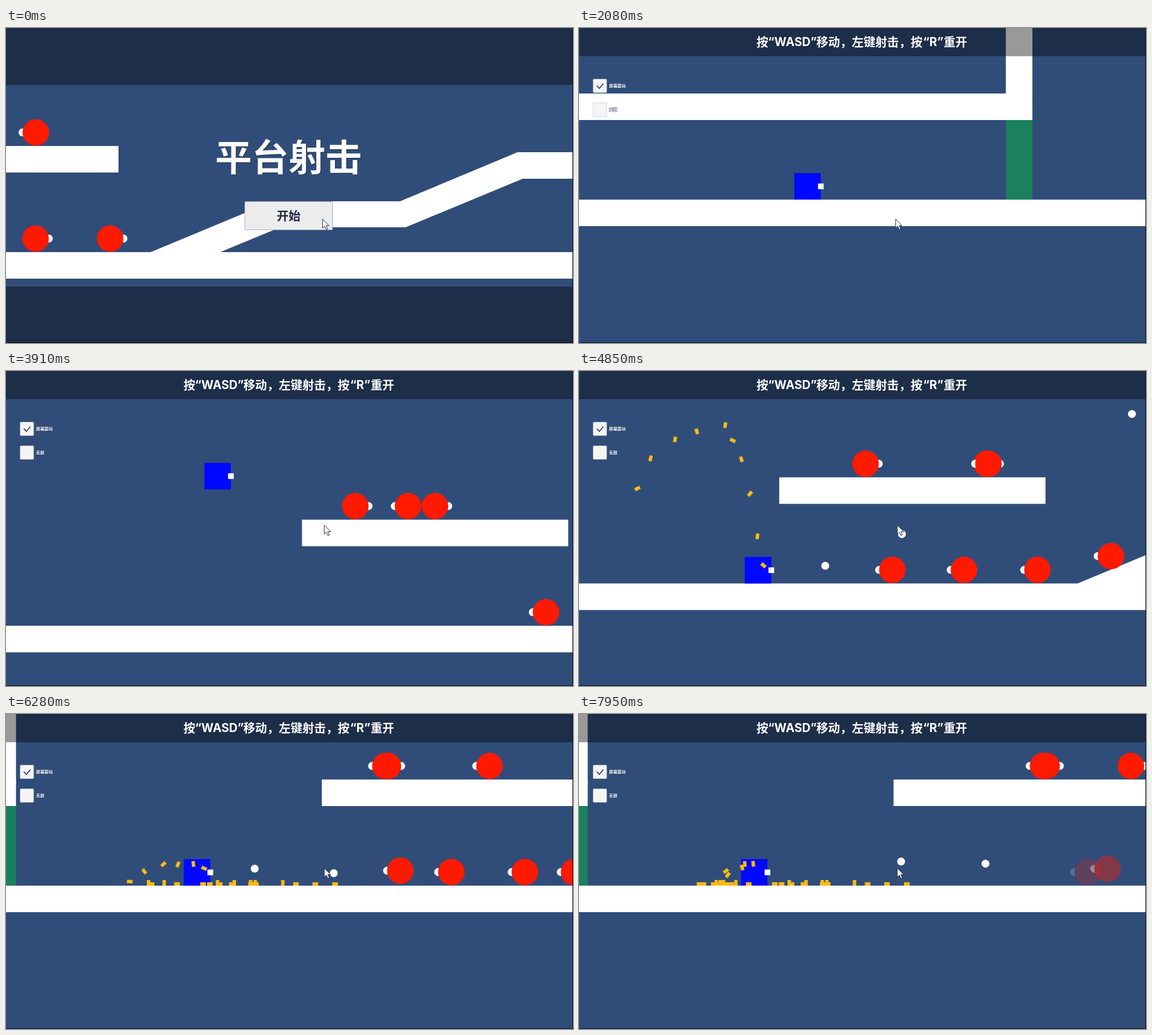
Recreate the animation shown at these times as an HTML page. Size 1003 by 558 pixels, loop 8000 ms.

```html
<!DOCTYPE html>
<html lang="zh-CN">
<head>
<meta charset="utf-8">
<title>平台射击</title>
<style>
  html, body { margin: 0; width: 100%; height: 100%; overflow: hidden; background: #304d79; }
  svg { display: block; width: 100vw; height: 100vh; }
  text { font-family: "Noto Sans CJK SC", "Noto Sans CJK", sans-serif; font-weight: 700; fill: #fff; }
  .latin { font-family: Inter, "Open Sans", sans-serif; text-anchor: middle; }
  .hint { font-size: 20.85px; }
  .small { font-size: 7.4px; paint-order: stroke; stroke: #27406a; stroke-width: .8px; }
  .mid { text-anchor: middle; }
  .box { fill: #f5f5f5; stroke: #b9bfcb; stroke-width: .6px; }
</style>
</head>
<body>
<svg viewBox="0 0 1003 558" preserveAspectRatio="none">
  <rect width="1003" height="558" fill="#304d79"/>
  <g id="world">
    <g fill="#fff">
      <rect x="-3000" y="0" width="6000" height="47"/>
      <rect x="-3000" y="-188" width="3047" height="47"/>
      <rect x="0" y="-1200" width="47" height="1020"/>
      <rect x="588" y="-188" width="471" height="47"/>
      <path d="M1116 1V0L1332-90H1557L1765-177H1950V-130H1774L1567-44H1345L1239 0V1Z"/>
    </g>
    <rect x="0" y="-141" width="47" height="141" fill="#1a805e"/>
    <g id="actors"></g>
  </g>
  <g id="menu">
    <path d="M0 0H1003V101H0ZM0 458H1003V558H0Z" opacity=".4"/>
    <text class="mid" x="501" y="254" font-size="65" style="fill:#1c2c4a">平台射击</text>
    <text class="mid" x="500" y="253" font-size="65">平台射击</text>
    <rect id="button" x="422.500" y="307.500" width="155" height="50" rx="1.500" stroke="#a9adb8"/>
    <text class="mid" x="500" y="340" font-size="21" style="fill:#1e2742">开始</text>
  </g>
  <g id="hud">
    <rect width="1003" height="50" opacity=".4"/>
    <g class="hint">
      <text x="314" y="32">按</text>
      <text class="latin" x="377.500" y="32">“WASD”</text>
      <text x="420" y="32">移动，左键射击，按</text>
      <text class="latin" x="626.500" y="32">“R”</text>
      <text x="645" y="32">重开</text>
    </g>
    <rect class="box" x="25" y="90.500" width="24" height="24" rx="1.500"/>
    <path d="M31.500 102L36 107L43 98.500" fill="none" stroke="#26324f" stroke-width="1.600"/>
    <text class="small" x="53" y="105">屏幕震动</text>
    <rect class="box" x="25" y="132.500" width="24" height="24" rx="1.500"/>
    <text class="small" x="53" y="147">无敌</text>
  </g>
  <path id="cursor" d="M0 0V16L3.700 12.600L6.500 18.500L9 17.400L6.300 11.600H11.400Z" fill="#fff" stroke="#1b2338"/>
  <path d="M0 557.500H1002.500V0" fill="none" stroke="#0a0f1a"/>
</svg>
<script>
const LOOP = 8000, PLAY = 450, STEP = 5;
const FOLLOW = 5, LOOK = 188;             // camera rate per second, look-ahead in px
const JUMP = 3530, AIR = 1210, PEAK = 280;
const BULLET = 1.42;                      // px per ms
const LEDGE = 612, BEAT = 423;            // guards' left turn and width of their walk

const $ = id => document.getElementById(id);
const rnd = n => { const v = Math.sin(n * 127.1) * 43758.5; return v - Math.floor(v); };
const clamp = (v, a, b) => Math.min(b, Math.max(a, v));
const repeat = (n, make) => Array.from({ length: n }, (_, i) => make(i));

// Straight moves through [time, value] points
function track(pts, t) {
  let i = 1;
  while (i < pts.length - 1 && t > pts[i][0]) i++;
  const [a, x] = pts[i - 1], [b, y] = pts[i];
  return x + (y - x) * (t - a) / (b - a);
}

// World: x from the left side of the door, heights from the floor
const walk = [[0, -798], [1150, -798], [3760, 390], [3910, 415], [4300, 527],
  [4945, 527], [5490, 320], [5640, 285], [6200, 345], [7950, 318]];
const playerX = t => track(walk, t);
const facing = t => t > 4945 && t < 5640 ? -1 : 1;
function jump(t) {
  const s = clamp((t - JUMP) / AIR, 0, 1);
  return 4 * PEAK * s * (1 - s);
}

// Camera eases after the player
const camera = [];
{
  const aim = t => 477.5 - LOOK * facing(t) - playerX(t);
  const ease = 1 - Math.exp(-FOLLOW * STEP / 1000);
  let x = aim(0), y = 0;
  for (let t = 0; t <= LOOP + STEP; t += STEP) {
    camera.push([x, y]);
    x += (aim(t) - x) * ease;
    y += (jump(t) - y) * ease;
  }
}
function view(t) {
  const i = Math.floor(t / STEP), f = t / STEP - i, a = camera[i], b = camera[i + 1];
  return [a[0] + (b[0] - a[0]) * f, 304 + a[1] + (b[1] - a[1]) * f];
}

const rise = x => clamp((x - 1116) * 0.4167, 0, 90);

// Guards pace to and fro on the platform
const guard = (phase, speed) => t => {
  const lap = 2 * BEAT, u = ((phase + speed * (t - 3910) / 1000) % lap + lap) % lap;
  return { x: LEDGE + BEAT - Math.abs(u - BEAT), h: 212, dir: u < BEAT ? 1 : -1, alpha: 1, alive: true };
};

// Chasers walk left, are pushed back under fire, then hop and fade
const chaser = (x0, die, held) => t => {
  const stop = die - held;
  const x = x0 - 0.25 * (Math.min(t, stop) - 4850) + 0.06 * Math.max(0, t - stop);
  const s = clamp((t - die) / 200, 0, 1);
  return {
    x, h: rise(x) + 24 + 68 * s * (1 - s), dir: -1,
    alpha: clamp(1 - (t - die) / 300, 0, 1), alive: t < die
  };
};

const foes = [
  guard(70, 290), guard(211, 307), guard(682, 311),
  chaser(785, 4960, 120),
  ...repeat(4, i => chaser(915 + 130 * i, 5985 + 288 * i, 120)),
  ...repeat(2, i => chaser(1392 + 52 * i, 7716 + 54 * i, 780))
];

function bulletAt(s, t) {
  const d = (t - s.t) * BULLET;
  return { x: s.x + s.dir * d, h: s.h - d * s.slope };
}
function blocked(b, t) {
  if (b.x > 588 && b.x < 1059 && b.h > 141 && b.h < 188) return true;
  if (b.x > 1116 && b.h < rise(b.x)) return true;
  return foes.some(foe => {
    const e = foe(t);
    return e.alpha > 0 && Math.abs(b.h - e.h) < 27 && b.x > e.x + (e.alive ? -26 : 2) && b.x < e.x + 32;
  });
}

// Each shot has a bullet and a falling shell; aim drifts up and now and then dips
const burst = (start, count, gap) => repeat(count, i => start + gap * i);
const shots = [...burst(3925, 11, 95.5), ...burst(4967, 7, 97), ...burst(5707, 21, 104)].map((t, i) => {
  const dir = facing(t), dip = (1 + Math.cos(1.7 * (i - 14))) / 2;
  const s = {
    t, dir, x: playerX(t) + 24 + dir * 24, h: jump(t) + 24,
    slope: -0.08 + 0.205 * dip ** 3,
    vx: 125 + 40 * rnd(i + 1), vy: 118 + 24 * rnd(i + 51),
    spin: 300 + 500 * rnd(i + 101), upright: rnd(i + 151) < 0.2
  };
  s.fall = (s.vy + Math.sqrt(s.vy ** 2 + 1040 * (s.h - 3))) / 520;
  for (s.end = t; s.end < t + 900; s.end += 4) {
    const b = bulletAt(s, s.end);
    if (b.h < 1) s.splash = b.x;
    if (b.h < 1 || blocked(b, s.end)) break;
  }
  return s;
});

const dot = (x, y, r, fill, more = '') => `<circle cx="${x}" cy="${y}" r="${r}" fill="${fill}" ${more}/>`;
const rect = (x, y, w, h, fill, more = '') =>
  `<rect x="${x}" y="${y}" width="${w}" height="${h}" fill="${fill}" ${more}/>`;

const drawFoe = ({ x, h, dir, alpha = 1 }) => alpha <= 0 ? '' :
  `<g opacity="${alpha}">${dot(x + dir * 23.5, -h, 7, '#fff')}${dot(x, -h, 23.5, '#ff1a00')}</g>`;

function drawShell(s, t) {
  const age = (t - s.t) / 1000, u = Math.min(age, s.fall), down = age >= s.fall;
  const x = s.x - s.dir * (4 + s.vx * u);
  const y = -(s.h + s.vy * u - 260 * u * u) - (down && s.upright ? 2 : 0);
  const turn = down ? (s.upright ? 90 : 0) : s.spin * u;
  return rect(-5, -3, 10, 6, '#fdb913', `transform="translate(${x} ${y}) rotate(${turn})"`);
}

function drawSplash(s, t) {
  const age = t - s.end;
  if (s.splash === undefined || age < 0 || age > 180) return '';
  return repeat(6, i => {
    const a = i * Math.PI / 3 + 0.45, r = 4 + age * 0.07;
    return dot(s.splash + r * Math.cos(a), -3 + r * Math.sin(a), 3.2, '#ffd21f', 'stroke="#c99508" stroke-width=".8"');
  }).join('');
}

function drawGame(t) {
  const x = playerX(t), y = -jump(t), fired = shots.filter(s => s.t <= t);
  let out = foes.map(foe => drawFoe(foe(t))).join('');
  out += rect(x, y - 47, 47, 47, '#0008ff');
  out += rect(x + 18.5 + facing(t) * 23.5, y - 28.5, 10, 10, '#fff');
  for (const s of fired) out += drawShell(s, t) + drawSplash(s, t);
  for (const s of fired) {
    if (t >= s.end) continue;
    const b = bulletAt(s, t);
    out += dot(b.x, -b.h, 7, '#fff');
  }
  return out;
}

const drawMenu = t => [[913, 212, -1], [912, 24, 1], [1044, 24, 1]]
  .map(([x, h, dir]) => drawFoe({ x: x + dir * t * 0.25, h, dir })).join('');

function render(t) {
  const playing = t >= PLAY, [x, y] = playing ? view(t) : [-860, 397];
  const aim = clamp((t - 2950) / 300, 0, 1);
  $('world').setAttribute('transform', `translate(${x.toFixed(2)} ${y.toFixed(2)})`);
  $('actors').innerHTML = playing ? drawGame(t) : drawMenu(t);
  $('menu').style.display = playing ? 'none' : '';
  $('hud').style.display = playing ? '' : 'none';
  $('button').setAttribute('fill', t > 120 && t < 260 ? '#c8c8c8' : '#ececec');
  $('cursor').setAttribute('transform', `translate(${560 + 3 * aim} ${338.5 - 65.5 * aim})`);
}

const begin = performance.now();
function tick() {
  render((performance.now() - begin) % LOOP);
  requestAnimationFrame(tick);
}
tick();
</script>
</body>
</html>
```
